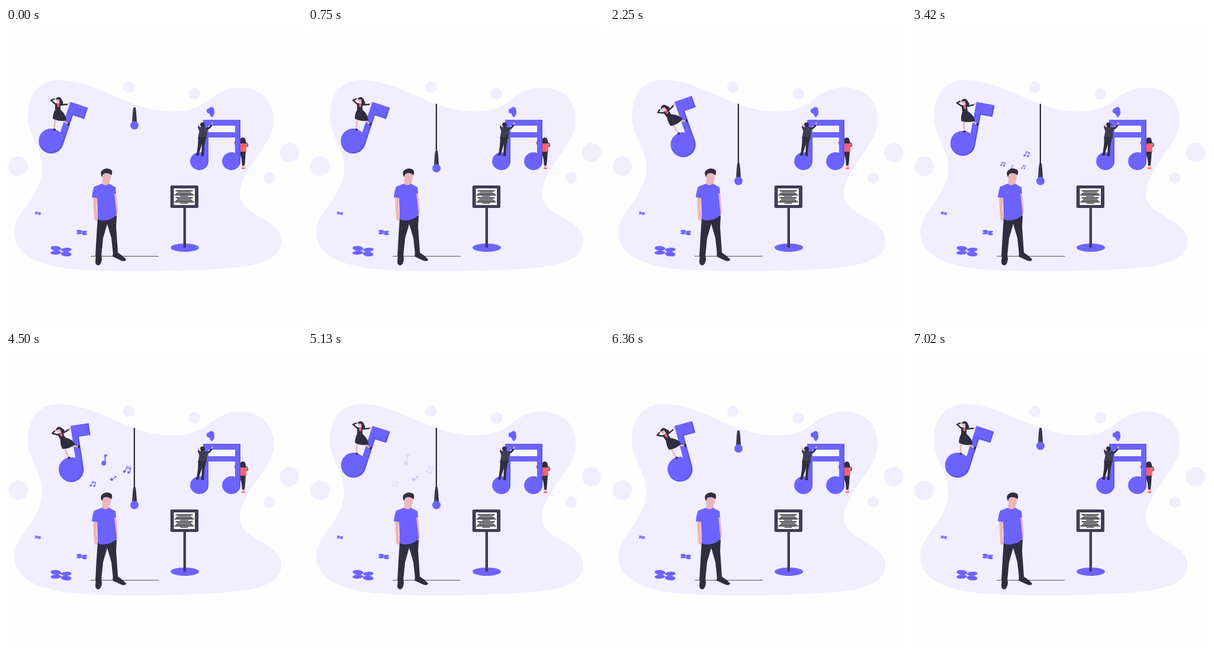
Recreate the animation shown at these times as an HTML page. Size 500 by 500 pixels, loop 7110 ms.

```html
<!DOCTYPE html>
<html lang="en">
<head>
<meta charset="utf-8">
<title>Music stage</title>
<style>
  html, body { margin: 0; width: 100%; height: 100%; overflow: hidden; background: #fefefe; }
  svg { display: block; width: 100vw; height: 100vh; }
  .main { fill: #6c63ff; }
  .shade { fill: #5d55e0; }
  .dark { fill: #2f2e41; }
  .suit { fill: #3f3d56; }
  .skin { fill: #ecb6b8; }
  .red { fill: #ff6067; }
  .line { fill: none; stroke-linecap: round; stroke-linejoin: round; }
</style>
</head>
<body>
<svg viewBox="0 0 500 500">
  <defs>
    <g id="flower" class="main">
      <ellipse cx="-9" cy="-4" rx="9" ry="4" transform="rotate(5)"/>
      <ellipse cx="9" cy="4" rx="9" ry="4" transform="rotate(5)"/>
      <ellipse cx="-9" cy="2" rx="9" ry="3.4" transform="rotate(-3)"/>
      <ellipse cx="9" cy="-2" rx="9" ry="3.4" transform="rotate(-3)"/>
    </g>
    <g id="pair" transform="rotate(12)">
      <path d="M-2.5 4V-5L4.5-5V3M-2.5-2.5H4.5" class="line" stroke="#6c63ff" stroke-width="1.2"/>
      <circle cx="-4" cy="4" r="2" class="main"/><circle cx="3" cy="3.5" r="2" class="main"/>
    </g>
    <g id="single" class="main">
      <circle cx="-1" cy="6" r="4.2"/><path d="M0-9L5-10V-6L2.3-5.4L3 6H1Z"/>
    </g>
  </defs>

  <g fill="#f0eeff">
    <path d="M90 88C140 88 185 120 230 133C275 146 315 145 345 120C372 97 405 96 428 109C452 122 457 155 448 178C438 205 395 245 395 280C396 320 465 320 465 360C465 400 400 405 340 408C260 412 150 413 95 405C50 398 14 380 14 345C14 310 61 285 61 237C61 200 38 185 37 150C37 115 53 88 90 88Z"/>
    <circle cx="207.5" cy="100" r="9.7"/><circle cx="318.5" cy="111.3" r="9.7"/>
    <circle cx="20.7" cy="233.5" r="16.5"/><circle cx="479" cy="210.5" r="16.3"/>
    <circle cx="444.5" cy="253.5" r="9.7"/>
  </g>

  <use href="#flower" transform="translate(93 377)"/>
  <use href="#flower" transform="translate(128 345.5) scale(.5)"/>
  <use href="#flower" transform="translate(54 313) scale(.3)"/>

  <!-- swinging note, drawn at its rightmost tilt -->
  <g id="swing">
    <g transform="translate(109 125) rotate(18.5)">
      <g class="shade"><circle cx="-10" cy="73" r="21"/><path d="M0 0H31V20H11V73H0Z"/></g>
      <g class="main"><circle cx="-11.2" cy="72" r="19.8"/><path d="M0 0H28.5V18H8.6V72H0Z"/></g>
    </g>
    <path class="line" stroke="#ecb6b8" stroke-width="2.6" d="M83 154L81.5 170M94 154L103 161M84 120L79 121M102 129L107 128"/>
    <path class="line" stroke="#2f2e41" stroke-width="2.4" d="M84 129L76 122L81 120M92 130L103 129"/>
    <path class="dark" d="M83 127L92 127L92 138Q102 147 102 156Q90 159 79 153Q79 145 83 138Z"/>
    <path class="red" d="M86 127L90.5 127L89.5 134L86.5 133Z"/>
    <path class="dark" d="M84 120Q86 116 91 117Q94 119 95 123Q98 126 95 130Q90 130 90 123Z"/>
    <circle cx="87.3" cy="122.3" r="3.1" class="skin"/>
    <path class="dark" d="M83.5 120Q87 116 91 119L90 121Z"/>
    <ellipse cx="82" cy="171.5" rx="2.3" ry="1.6" class="dark"/>
    <ellipse cx="105.5" cy="162.5" rx="1.7" ry="2.6" transform="rotate(30 105.5 162.5)" class="dark"/>
  </g>

  <!-- girl behind the beamed note -->
  <g>
    <path class="line" stroke="#a0616a" stroke-width="3" d="M397 198L388 197L387 193M403 201L408 199L407 195"/>
    <path class="dark" d="M396 208H405L404 222L403 233H399L398 222L396 215Z"/>
    <path class="red" d="M395 194L405 194L406 209H396Z"/>
    <circle cx="400" cy="189.5" r="4.5" class="dark"/>
    <path class="dark" d="M395.5 189H404.5L406 195H396Z"/>
    <path class="line" stroke="#ecb6b8" stroke-width="2" d="M400 233V235M403 232V235"/>
    <ellipse cx="401" cy="237" rx="3.3" ry="1.2" class="red"/>
  </g>
  <g class="shade">
    <circle cx="327" cy="225" r="15"/><circle cx="381" cy="225" r="15"/>
    <path d="M333 155H396V225H387V185H342V225H333ZM342 165V176H387V165Z" fill-rule="evenodd"/>
  </g>
  <g class="main">
    <circle cx="325.7" cy="225" r="14.6"/><circle cx="379.7" cy="225" r="14.6"/>
    <path d="M333 155H394V225H387V185H341V225H333ZM342 165V176H387V165Z" fill-rule="evenodd"/>
  </g>
  <path fill="#f7f6ff" d="M342 165H387V176H342Z"/>
  <g class="main">
    <circle cx="343" cy="140" r="4.3"/><circle cx="347" cy="138" r="4.6"/>
    <path d="M343 141L352 140Q353 146 348 151Q344 149 343 141Z"/>
  </g>
  <path class="line" stroke="#5d55e0" stroke-width=".8" d="M341 143Q346 145 349 139"/>
  <g>
    <path class="line" stroke="#ecb6b8" stroke-width="2.2" d="M326 166L325 163M347 164L348.5 160.5"/>
    <path class="line" stroke="#2f2e41" stroke-width="3" d="M328 174L325.5 167M337 171L343 169L347 164.5"/>
    <path class="suit" d="M328 167L337 167L340 172L339 187H324Z"/>
    <path class="dark" d="M325 184H338L335 200L334 214H330L331 196L325.5 213H322L324 199Z"/>
    <circle cx="332" cy="163.3" r="3.9" class="dark"/>
    <ellipse cx="323.5" cy="214" rx="2.8" ry="1.5" class="dark"/>
    <ellipse cx="332" cy="215" rx="2.7" ry="1.5" class="dark"/>
  </g>

  <path id="cable" stroke="#17171c" stroke-width="2"/>
  <g id="mic">
    <path class="dark" d="M-1.5 0H1.5Q3 4 3.9 25H-3.9Q-3 4 -1.5 0Z"/>
    <path class="suit" d="M-.9 1H.3L.8 25H-3.2Z"/>
    <circle cy="30.5" r="7" class="main"/>
  </g>

  <!-- music stand -->
  <ellipse cx="302" cy="371" rx="24" ry="7" class="main"/>
  <path class="suit" d="M299.6 303H304V371H299.6Z"/>
  <rect x="277.7" y="266" width="47.3" height="38" rx="2.5" class="suit"/>
  <path fill="#fff" d="M283.5 271H319V299H283.5Z"/>
  <path id="lines" stroke="#17171c" stroke-width="1.4"/>

  <g id="notes"></g>

  <!-- singer -->
  <path stroke="#555463" stroke-width="1" d="M143 385.5H258"/>
  <path class="skin" d="M147 284L154 285L153 305L155 324Q151 328 149 322L148 305ZM182 277L186 278L189 307L187 318L183 310Z"/>
  <path class="dark" d="M155 319L187 317L186 336L189 379L190 383H181L178 355L171 331L164 355L161 385H151L153 350Z"/>
  <path class="dark" d="M152 383L161 383L162 390Q161 400 156 401Q150 400 151 393ZM181 379Q187 382 190 380Q198 385 203 391Q202 395 195 393L180 386Z"/>
  <path class="skin" d="M163 255H175L175 264Q169 269 162 265Z"/>
  <path class="main" d="M162 263Q168 268 174 263L185 269L186 279L183 280L187 315Q180 324 166 325Q158 325 155 323L154 287L145 286Q146 275 149 268Z"/>
  <ellipse cx="170" cy="252" rx="7.3" ry="8.5" class="skin"/>
  <path class="dark" d="M162 252Q158 243 163 240Q169 235 177 239Q181 242 178 249L176 247Q169 243 164 247Z"/>
</svg>
<script>
const LOOP = 7110;
const byId = id => document.getElementById(id);
const clamp = x => Math.min(1, Math.max(0, x));
const span = (t, a, b) => clamp((t - a) / (b - a));
const smooth = p => (1 - Math.cos(Math.PI * p)) / 2;
const easeOut = p => 1 - (1 - p) ** 3;

// Smooth path through [time, value] keys.
function track(keys, t) {
  const i = keys.findIndex(k => k[0] > t);
  if (i < 1) return keys[i ? keys.length - 1 : 0][1];
  const [a, from] = keys[i - 1], [b, to] = keys[i];
  return from + (to - from) * smooth(span(t, a, b));
}

const tilt = [[1250, 18.5], [2170, -20], [3130, 18], [4130, -20.5], [5130, 18], [6130, -20.5], [7090, 18.5]];
const drop = [[0, 134], [1100, 228], [5480, 228], [6500, 128]];
const sway = [[1080, 0], [1440, 13], [1820, -9], [2200, 0]];

// shape, x, y, size, turn, start, arrival, fade start
const notes = [
  ['pair', 147, 223, .85, 0, 2900, 4500, 4700],
  ['pair', 205, 199, 1.05, 4, 2900, 4500, 4700],
  ['pair', 196, 231, .7, 0, 2900, 4400, 3700],
  ['single', 166, 182, .95, 0, 3360, 4500, 4700],
  ['single', 181, 213, .58, 42, 3800, 4600, 4800]
].map(([shape, x, y, size, turn, start, end, fade]) => {
  const el = document.createElementNS('http://www.w3.org/2000/svg', 'use');
  el.setAttribute('href', '#' + shape);
  byId('notes').append(el);
  return { el, x, y, size, turn, start, end, fade };
});

byId('lines').setAttribute('d', [14.5, 11.5, 14, 16.5, 7, 14.5, 12, 14, 16.5, 6.5]
  .map((w, i) => `M${301 - w} ${275 + i * 2.35}h${2 * w}`).join(''));

function draw(t) {
  byId('swing').setAttribute('transform', `rotate(${track(tilt, t) - 18.5} 109 125)`);

  const top = track(drop, t);
  byId('mic').setAttribute('transform', `translate(217 ${top}) rotate(${track(sway, t)})`);
  byId('cable').setAttribute('d', `M216.8 128V${128 + Math.max(0, (top - 134) / 94) * 101}`);

  for (const n of notes) {
    const p = easeOut(span(t, n.start, n.end));
    const x = 169 + (n.x - 169) * p, y = 245 + (n.y - 245) * p;
    n.el.setAttribute('transform', `translate(${x} ${y}) rotate(${n.turn}) scale(${n.size * (.3 + .7 * p)})`);
    n.el.setAttribute('opacity', t < n.start ? 0 : 1 - span(t, n.fade, n.fade + 500));
  }
}

const begin = performance.now();
function frame() {
  draw((performance.now() - begin) % LOOP);
  requestAnimationFrame(frame);
}
draw(0);
requestAnimationFrame(frame);
</script>
</body>
</html>
```
